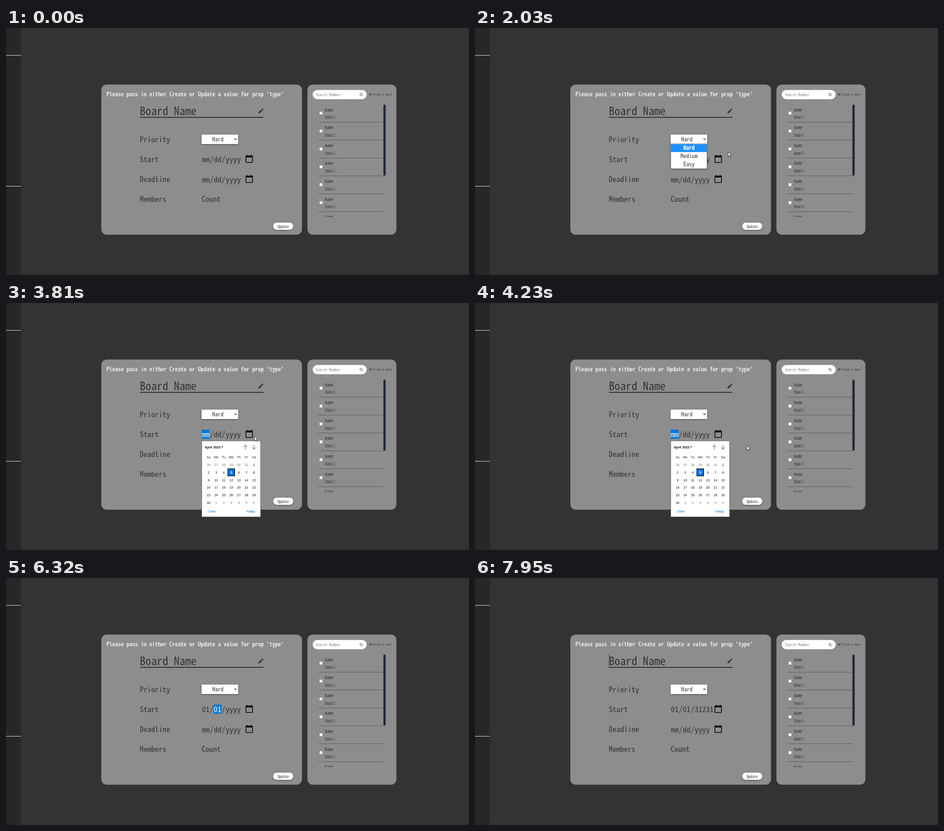
Recreate the animation shown at these times as an HTML page. Size 1025x547 px, loop 8 s.

```html
<!DOCTYPE html>
<html lang="en">
<head>
<meta charset="utf-8">
<title>Board form</title>
<style>
  html, body { margin: 0; width: 100%; height: 100%; overflow: hidden; background: #333; }
  svg { display: block; width: 100%; height: 100%; }
  text { font-family: 'Noto Sans Mono CJK JP', 'Noto Sans Mono', monospace; fill: #333; white-space: pre; }
  .mid { text-anchor: middle; }
  .raised { filter: drop-shadow(0 1.5px 1.5px #0008); }
  #picker text { font: 7.3px 'Liberation Sans', Arial, sans-serif; }
  #picker .link { fill: #0075d7; }
  #picker .month { font-weight: bold; fill: #111; }
</style>
</head>
<body>
<svg id="stage" viewBox="0 0 1025 547">
  <defs>
    <clipPath id="listClip"><rect x="690" y="168" width="146" height="250.5"/></clipPath>
    <path id="calendar" transform="scale(.8)" d="M18 2h-1V0h-2v2H5V0H3v2H2C.9 2 0 2.900 0 4v16c0 1.100.9 2 2 2h16c1.100 0 2-.9 2-2V4c0-1.100-.9-2-2-2zm0 18H2V7h16v13z"/>
  </defs>
  <rect width="1025" height="547" fill="#333"/>
  <rect y="546" width="1025" height="1" fill="#262626"/>
  <rect width="33" height="547" fill="#272727"/>
  <path d="M0 60.5h33M0 350.5h33" stroke="#e4e4e4"/>
  <g fill="#8d8d8d">
    <rect x="211" y="125.3" width="444.3" height="332.5" rx="12"/>
    <rect x="667.3" y="125.3" width="197" height="332.5" rx="12"/>
  </g>

  <path d="M296.5 197.8h273.5" stroke="#111" stroke-width="1.5"/>
  <path fill="#333" d="M559 189v-2.500l6-6 2.500 2.500-6 6zM565.800 179.800l1.300-1.300q.6-.5 1.200 0l1.300 1.300q.5.6 0 1.200l-1.300 1.300z"/>
  <use href="#calendar" x="530.4" y="280.9"/>
  <use href="#calendar" x="530.4" y="325.4"/>
  <rect class="raised" x="591.5" y="431" width="44.5" height="16" rx="8" fill="#fff"/>
  <rect class="raised" x="433" y="236" width="81" height="21" fill="#fff"/>
  <path d="M505.8 245l2.3 2.4 2.3-2.4" fill="none" stroke="#222" stroke-width="1.3"/>

  <rect x="679" y="137.3" width="119.5" height="20.5" rx="10.2" fill="#fff"/>
  <g fill="none" stroke="#444"><circle cx="785.8" cy="147" r="2.4"/><path d="M787.6 148.8l2.4 2.4"/></g>
  <path d="M804 146h4M804 148.5h4" stroke="#333" stroke-width="1.3"/>
  <g id="labels"></g>
  <g id="list" clip-path="url(#listClip)"></g>
  <rect x="835.5" y="169.5" width="5" height="157.5" rx="2.5" fill="#20283f"/>

  <rect id="mark" y="280.3" height="20.4" fill="#0078d7"/>
  <g id="date"></g>

  <g id="menu">
    <rect class="raised" x="433.5" y="256.7" width="80" height="55" fill="#fff" stroke="#777" stroke-width=".8"/>
    <rect id="hover" x="434" width="79" height="17.5" fill="#1e90ff"/>
  </g>
  <g id="picker">
    <rect x="433.5" y="305.5" width="130" height="168" fill="#fff" stroke="#777"/>
    <path d="M476.5 317.5h4.2l-2.1 2.7z" fill="#111"/>
    <path d="M530 324.5v-9.5m-4.3 4.3l4.3-4.3 4.3 4.3M549 314.5v9.5m-4.3-4.3l4.3 4.3 4.3-4.3" fill="none" stroke="#444"/>
    <rect x="491.2" y="367.2" width="15" height="15.6" fill="#0075ff" stroke="#111" stroke-width="1.5"/>
    <text class="month" x="440" y="321.6">April 2023</text>
    <text class="link" x="446.8" y="463.7">Clear</text>
    <text class="link" x="531.8" y="463.7">Today</text>
  </g>
  <path id="caret" d="M296.8 168.5v28.5" stroke="#333" stroke-width=".8"/>
  <path id="arrow" d="M0 0v10.3l2.4-2.2 1.6 3.7 1.7-.7-1.6-3.6h3.2z" fill="#fff" stroke="#111" stroke-width=".8"/>
  <path id="beam" d="M-2-5.5q2 0 2 1.2v8.6q0 1.2 2 1.2M2-5.5q-2 0-2 1.2m0 8.6q0 1.2-2 1.2" fill="none" stroke="#757575" stroke-width=".8"/>
</svg>
<script>
const $ = id => document.getElementById(id);

function add(parent, tag, attrs, content = '') {
  const el = document.createElementNS('http://www.w3.org/2000/svg', tag);
  for (const key in attrs) el.setAttribute(key, attrs[key]);
  el.textContent = content;
  return $(parent).appendChild(el);
}
const label = (parent, x, y, size, content, more) =>
  add(parent, 'text', { x, y, 'font-size': size, ...more }, content);

// Form
label('labels', 222.5, 151.3, 12.67, "Please pass in either Create or Update a value for prop 'type'",
  { style: 'fill:#fff;stroke:#fff;stroke-width:.25' });
label('labels', 296.3, 192.7, 25.12, 'Board Name');
['Priority', 'Start', 'Deadline', 'Members'].forEach((s, i) =>
  label('labels', 296.3, 252.6 + i * 44.2, 16.75, s));
label('labels', 433.2, 385.2, 16.75, 'Count');
label('labels', 456.5, 251.1, 12.56, 'Hard');
label('labels', 613.7, 442.6, 8.37, 'Update', { class: 'mid' });

const dateX = [433.8, 451.1, 460, 477.3, 486.3];
const dateRow = (parent, y) => ['mm', '/', 'dd', '/', 'yyyy'].map((s, i) =>
  label(parent, dateX[i], y, 16.75, s));
dateRow('labels', 341.7);
const fields = dateRow('date', 297.3);

// Members
label('labels', 686, 150.9, 8.37, 'Search Member', { style: 'fill:#858585' });
label('labels', 810, 149.7, 6.98, 'Filter');
label('labels', 833.5, 149.7, 6.8, '% Sort');
for (let i = 0; i < 7; i++) {
  const y = i * 39.62;
  label('list', 706, 184.6 + y, 9.42, 'Name');
  label('list', 706, 201.3 + y, 9.42, 'Email');
  add('list', 'rect', { x: 693.9, y: 185.1 + y, width: 7, height: 7, rx: 1.2, fill: '#fff', stroke: '#767676', 'stroke-width': .7 });
  add('list', 'rect', { x: 691, y: 208 + y, width: 145, height: 1.2, fill: '#626262' });
}

const options = ['Hard', 'Medium', 'Easy'].map((s, i) =>
  label('menu', 473.8, 269.7 + i * 18, 12.67, s, { class: 'mid' }));

// Date picker: April 2023 starts on a Saturday
function cell(col, row, s, style) {
  add('picker', 'text', { class: 'mid', x: 448.5 + col * 16.75, y: 344.1 + row * 16.8, style }, s);
}
['Su', 'Mo', 'Tu', 'We', 'Th', 'Fr', 'Sa'].forEach((s, i) => cell(i, 0, s, 'fill:#222'));
for (let i = 0; i < 42; i++) {
  const day = i - 5;
  const shown = day < 1 ? day + 31 : day > 30 ? day - 30 : day;
  const style = day === 5 ? 'fill:#fff;font-weight:bold' : day === shown ? 'fill:#111' : 'fill:#757575';
  cell(i % 7, 1 + Math.floor(i / 7), shown, style);
}

// Pointer stops: time, x, y
const path = [
  [590, 970.5, 541.5], [1250, 490, 246], [1500, 490, 246], [1750, 481, 213], [2030, 560.5, 274.5],
  [2360, 507, 246], [2560, 505, 244], [2960, 483, 293], [3130, 483, 293], [3380, 480, 264],
  [3450, 480, 264], [3660, 538, 290], [3740, 538, 290], [4020, 613, 321], [4230, 602, 316],
  [4520, 602, 316], [4850, 451, 291], [5200, 451, 291], [5380, 481, 291], [5500, 481, 291],
  [5960, 501, 294], [7260, 501, 294], [7760, 421.5, 187]
];
function pointer(t) {
  const i = path.findIndex(p => p[0] > t);
  if (i === 0) return path[0].slice(1);
  if (i < 0) return path[path.length - 1].slice(1);
  const [a, b] = [path[i - 1], path[i]];
  const k = (t - a[0]) / (b[0] - a[0]);
  const e = k * k * (3 - 2 * k);
  return [1, 2].map(n => a[n] + (b[n] - a[n]) * e);
}

// Last value whose time has come
const at = (t, steps) => steps.reduce((v, [time, next]) => t >= time ? next : v, undefined);
const show = (id, on) => { $(id).style.display = on ? '' : 'none'; };

function draw(t) {
  const [x, y] = pointer(t);
  const beam = t >= 4780;
  show('arrow', t >= 420 && !beam);
  show('beam', beam);
  $(beam ? 'beam' : 'arrow').setAttribute('transform', `translate(${x} ${y})`);

  show('menu', t >= 1300 && t < 3430);
  const pick = x < 514 ? Math.max(0, Math.min(2, Math.floor((y - 257) / 18))) : 0;
  $('hover').setAttribute('y', 257.2 + pick * 18);
  options.forEach((o, i) => {
    o.style.fill = i === pick ? '#fff' : '#333';
    o.style.fontWeight = i === pick ? 'bold' : '';
  });

  show('picker', t >= 3700 && t < 4520);
  show('caret', t >= 7800);

  const values = [
    at(t, [[0, 'mm'], [5040, '01']]), '/',
    at(t, [[0, 'dd'], [6170, '01']]), '/',
    at(t, [[0, 'yyyy'], [6660, '0003'], [6730, '0031'], [6870, '0312'], [7000, '3123'], [7260, '31231']])
  ];
  const active = at(t, [[0, -1], [3700, 0], [5900, 2], [6510, 4], [7800, -1]]);
  fields.forEach((f, i) => {
    f.textContent = values[i];
    f.style.fill = i === active ? '#fff' : '#333';
  });
  show('mark', active >= 0);
  if (active >= 0) {
    $('mark').setAttribute('x', dateX[active] - .5);
    $('mark').setAttribute('width', values[active].length * 8.375 + 1);
  }
}

const start = performance.now();
function tick() {
  draw((performance.now() - start) % 8000);
  requestAnimationFrame(tick);
}
tick();
</script>
</body>
</html>
```
